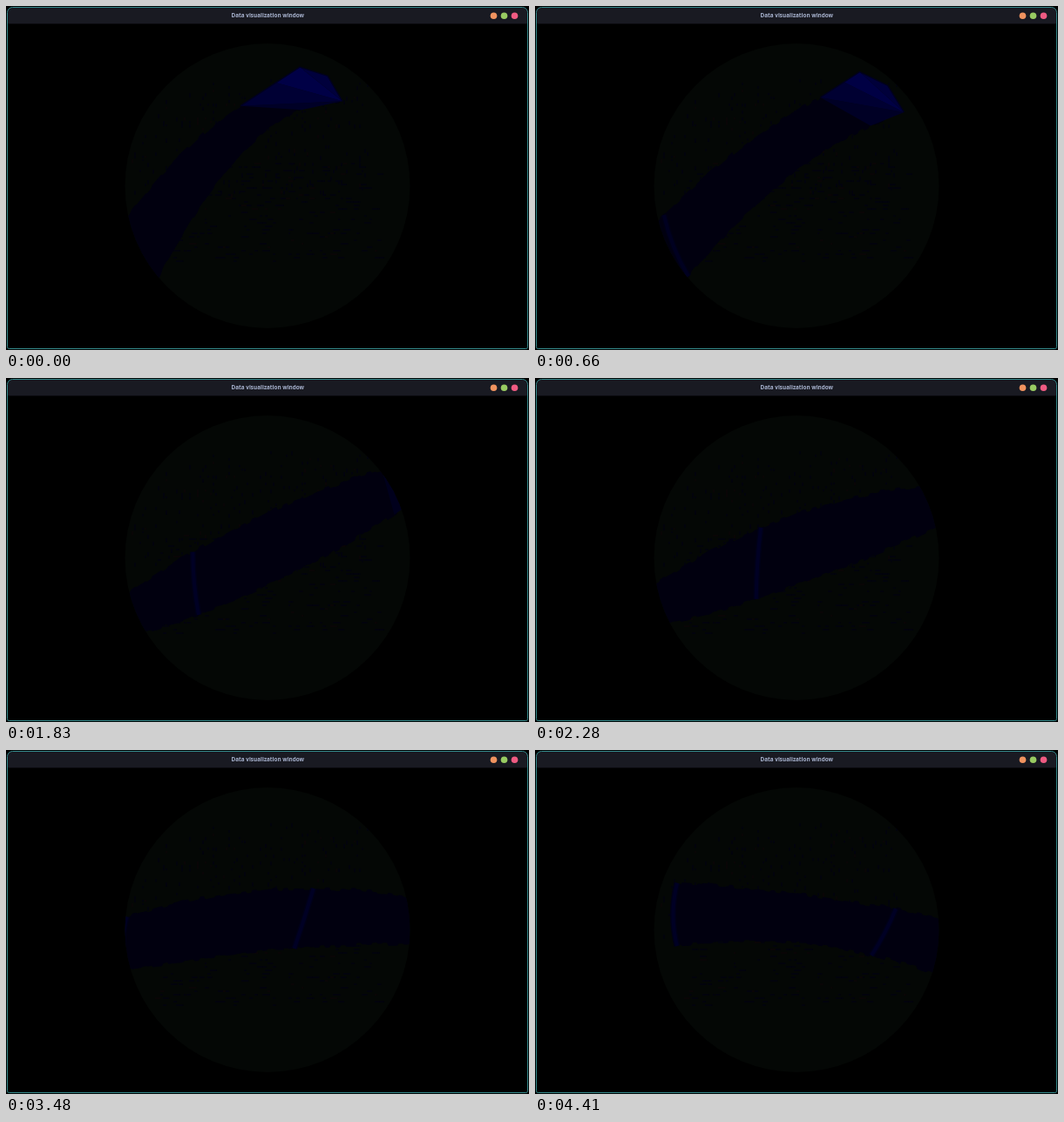
Animation, 600 px wide and 395 px high, one loop 4440 ms. Source, as an HTML page with a canvas:

```html
<!DOCTYPE html>
<html lang="en">
<head>
<meta charset="utf-8">
<title>Data visualization window</title>
<style>
html, body { margin: 0; width: 100%; height: 100%; overflow: hidden; background: #000; }
canvas { display: block; }
</style>
</head>
<body>
<canvas id="stage" width="600" height="395"></canvas>
<script>
const ctx = document.getElementById('stage').getContext('2d');
const LOOP = 4440, STEP = 30;

// Height of each band edge at x = 150, 300 and 450, and the seam's two x positions.
const poses = [
  { t: 0,    top: [228, 97, 80],   bottom: [363, 143, 128], seam: [120, 160] },
  { t: 660,  top: [238, 120, 62],  bottom: [342, 190, 114], seam: [148, 176] },
  { t: 1410, top: [247, 150, 80],  bottom: [308, 233, 135], seam: [178, 195] },
  { t: 2700, top: [216, 157, 143], bottom: [273, 236, 195], seam: [297, 283] },
  { t: 4410, top: [152, 165, 189], bottom: [227, 222, 254], seam: [414, 386] }];

const mix = (a, b, k) => a + (b - a) * k;
const mixPoint = (p, q, k) => [mix(p[0], q[0], k), mix(p[1], q[1], k)];
const clamp = v => Math.min(1, Math.max(0, v));
const hash = n => { const v = Math.sin(n * 127.1) * 43758.5453; return v - Math.floor(v); };

// Smooth motion of one pose value through all poses.
function track(t, key, j) {
  const last = poses.length - 1;
  const value = i => poses[i][key][j];
  const slope = i => {
    const lo = Math.max(0, i - 1), hi = Math.min(last, i + 1);
    return (value(hi) - value(lo)) / (poses[hi].t - poses[lo].t);
  };
  let i = 0;
  while (i < last - 1 && t >= poses[i + 1].t) i++;
  const span = poses[i + 1].t - poses[i].t, k = clamp((t - poses[i].t) / span);
  return mix(value(i), value(i + 1), k * k * (3 - 2 * k)) +
    span * k * (1 - k) * (slope(i) * (1 - k) - slope(i + 1) * k);
}

// The parabola an edge follows at time t.
function edgeAt(t, key) {
  const [a, b, c] = [0, 1, 2].map(j => track(t, key, j));
  return x => {
    const u = (x - 300) / 150;
    return b + u * (c - a) / 2 + u * u * (a + c - 2 * b) / 2;
  };
}

function ragged(edge, from, to, seed) {
  const points = [];
  for (let x = from; x < to; x += 2) {
    points.push([x, edge(x) + (hash(Math.floor(x / 6) + seed) - .5) * 5]);
  }
  return points;
}

function polygon(points, fill) {
  ctx.beginPath();
  points.forEach(p => ctx.lineTo(...p));
  ctx.closePath();
  ctx.fillStyle = fill;
  ctx.fill();
}

// The point halfway from a to b, pushed off the chord.
function bulged(a, b, amount) {
  const dx = b[0] - a[0], dy = b[1] - a[1], len = Math.hypot(dx, dy) || 1;
  return [(a[0] + b[0]) / 2 - dy / len * amount, (a[1] + b[1]) / 2 + dx / len * amount];
}

function drawSeam(a, b, bulge) {
  ctx.beginPath();
  ctx.moveTo(...a);
  ctx.quadraticCurveTo(...bulged(a, b, bulge), ...b);
  [[7, '#000017'], [4, '#000024']].forEach(([width, color]) => {
    ctx.lineWidth = width;
    ctx.strokeStyle = color;
    ctx.stroke();
  });
}

function disc(x, y, r, fill) {
  ctx.beginPath();
  ctx.arc(x, y, r, 0, Math.PI * 2);
  ctx.fillStyle = fill;
  ctx.fill();
}

function drawWindow() {
  ctx.fillStyle = '#000';
  ctx.fillRect(0, 0, 600, 395);
  ctx.beginPath();
  ctx.roundRect(1.5, 1.5, 597, 392, [6, 6, 2, 2]);
  ctx.save();
  ctx.clip();
  ctx.fillStyle = '#191a22';
  ctx.fillRect(0, 0, 600, 20.4);
  ctx.restore();
  ctx.lineWidth = 1;
  ctx.strokeStyle = '#348a8c';
  ctx.stroke();
  ctx.font = '700 6.35px "Open Sans", sans-serif';
  ctx.textAlign = 'center';
  ctx.fillStyle = '#a9b4d0';
  ctx.fillText('Data visualization window', 300.3, 13.3);
  ['#f0935f', '#98cb62', '#ef5b82'].forEach((c, i) => disc(559.5 + 12 * i, 11.2, 3.8, c));
}

// Dots at the upper left, horizontal dashes at the lower right.
function drawSpecks() {
  for (let i = 0; i < 480; i++) {
    const dash = i % 2, length = 2 + hash(i + .7) * (dash ? 7 : 3);
    const x = dash ? 170 + hash(i) * 260 : 145 + hash(i) * 270;
    const y = dash ? 180 + hash(i + .4) * 112 : 85 + hash(i + .4) * 130;
    ctx.fillStyle = i % 7 ? '#02030c' : '#090506';
    ctx.fillRect(Math.round(x / 3) * 3, Math.round(y / 4) * 4, dash ? length : 2, dash ? 2 : length);
  }
}

function drawBand(t) {
  const top = edgeAt(t, 'top'), bottom = edgeAt(t, 'bottom');
  const k = t / 1830;

  // Corners of the lit end face, which slides out of view at the right.
  const peak = [337 + 98 * k, 70 + 43 * k * k];
  const leftX = Math.min(269 + 162 * k, peak[0]);
  const rightX = 386 + 69 * k ** .6;
  const lowX = mix(leftX, rightX, .6);
  const left = [leftX, top(leftX)], right = [rightX, bottom(rightX)], low = [lowX, bottom(lowX)];
  const arc = mixPoint(left, peak, .6);
  const shoulder = bulged(peak, right, -12 * clamp(1.2 - k));

  // The band's near end enters at the left late in the loop.
  const startX = Math.max(130, 163 - .026 * (LOOP - STEP - t));
  const a = [startX, top(startX)], b = [startX, bottom(startX)];
  polygon([bulged(a, b, 6), ...ragged(top, startX, leftX, 3), left, peak, shoulder, right,
    ...ragged(bottom, startX, rightX, 71).reverse()], '#01000f');

  const [s0, s1] = [0, 1].map(j => track(t, 'seam', j));
  ctx.globalAlpha = mix(.6, 1, clamp(t / 1400));
  drawSeam([s0, top(s0)], [s1, bottom(s1)], 8 - t / 400);
  ctx.globalAlpha = clamp((t - 3150) / 400);
  drawSeam(a, b, 9);

  ctx.globalAlpha = clamp((2250 - t) / 420) * mix(1, .6, clamp((t - 600) / 1230));
  const rim = [low, left, arc, peak, shoulder];
  ['#000026', '#000034', '#000046', '#00003c'].forEach((color, i) =>
    polygon([right, rim[i], rim[i + 1]], color));
  ctx.beginPath();
  [left, arc, peak, shoulder, right].forEach(p => ctx.lineTo(...p));
  ctx.lineWidth = 1.5;
  ctx.strokeStyle = '#00001e';
  ctx.stroke();
  ctx.globalAlpha = 1;
}

function frame(now) {
  const t = Math.floor(now % LOOP / STEP) * STEP;
  drawWindow();
  ctx.save();
  disc(300, 206.5, 163.5, '#040705');
  ctx.clip();
  drawSpecks();
  drawBand(t);
  ctx.restore();
  requestAnimationFrame(frame);
}
requestAnimationFrame(frame);
</script>
</body>
</html>
```
